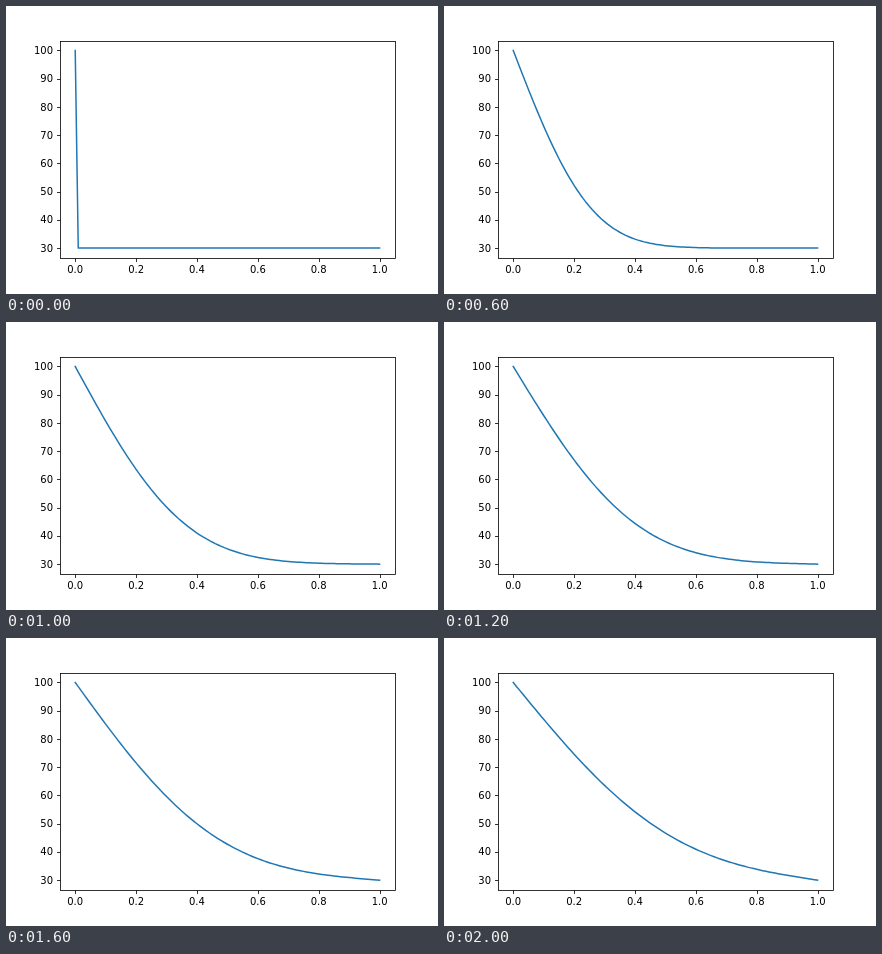
An HTML page for the animation above (2200 ms loop, 432 by 288 pixels).

```html
<!DOCTYPE html>
<html lang="en">
<head>
<meta charset="utf-8">
<title>Heat diffusion in a rod</title>
<style>
  html, body { margin: 0; width: 100%; height: 100%; overflow: hidden; background: #fff; }
  svg { display: block; width: 432px; height: 288px; }
  text { font: 10px "DejaVu Sans", sans-serif; fill: #000; }
  .axes { fill: none; stroke: #000; stroke-width: .8; }
  .curve { fill: none; stroke: #1f77b4; stroke-width: 1.5; stroke-linejoin: round; stroke-linecap: square; }
</style>
</head>
<body>
<svg viewBox="0 0 432 288">
  <polyline class="curve" id="curve"/>
  <path class="axes" id="ticks"/>
  <rect class="axes" x="54.5" y="35.5" width="335" height="217"/>
  <g id="labels"></g>
</svg>
<script>
const HOLD = 200, FRAMES = 11;
const CELLS = 100, HOT = 100, COLD = 30;
const RATE = 0.1, STEPS_PER_FRAME = 1000;

const toX = x => 69.218 + x * 304.364;
const toY = temp => 242.116 - (temp - COLD) * 197.673 / 70;
const snap = v => Math.round(v) + 0.5;

const curve = document.getElementById('curve');
const labels = document.getElementById('labels');

function addLabel(text, x, y, anchor) {
  const el = document.createElementNS('http://www.w3.org/2000/svg', 'text');
  el.setAttribute('x', x);
  el.setAttribute('y', y);
  el.setAttribute('text-anchor', anchor);
  el.textContent = text;
  labels.append(el);
}

function drawAxes() {
  let path = '';
  for (let i = 0; i <= 5; i++) {
    const x = toX(i / 5);
    path += `M${snap(x)} 252.5v3.5`;
    addLabel((i / 5).toFixed(1), x, 267, 'middle');
  }
  for (let temp = COLD; temp <= HOT; temp += 10) {
    const y = toY(temp);
    path += `M54.5 ${snap(y)}h-3.5`;
    addLabel(temp, 47, Math.round(y + 3.6), 'end');
  }
  document.getElementById('ticks').setAttribute('d', path);
}

// Explicit heat equation step with both ends held fixed.
function diffuse(u) {
  return u.map((v, i) => i === 0 || i === CELLS ? v : v + RATE * (u[i - 1] - 2 * v + u[i + 1]));
}

const toPoints = u => Array.from(u, (temp, i) =>
  `${toX(i / CELLS).toFixed(2)},${toY(temp).toFixed(2)}`).join(' ');

// The start state, the state after one step, then one per full batch of steps.
function simulate() {
  let u = new Float64Array(CELLS + 1).fill(COLD);
  u[0] = HOT;
  const shots = [toPoints(u)];
  for (let step = 0; shots.length < FRAMES; step++) {
    u = diffuse(u);
    if (step % STEPS_PER_FRAME === 0) shots.push(toPoints(u));
  }
  return shots;
}

drawAxes();
const shots = simulate();
const start = performance.now();
let shown = -1;

function render() {
  const index = Math.floor((performance.now() - start) / HOLD) % FRAMES;
  if (index !== shown) {
    curve.setAttribute('points', shots[index]);
    shown = index;
  }
  requestAnimationFrame(render);
}
render();
</script>
</body>
</html>
```
